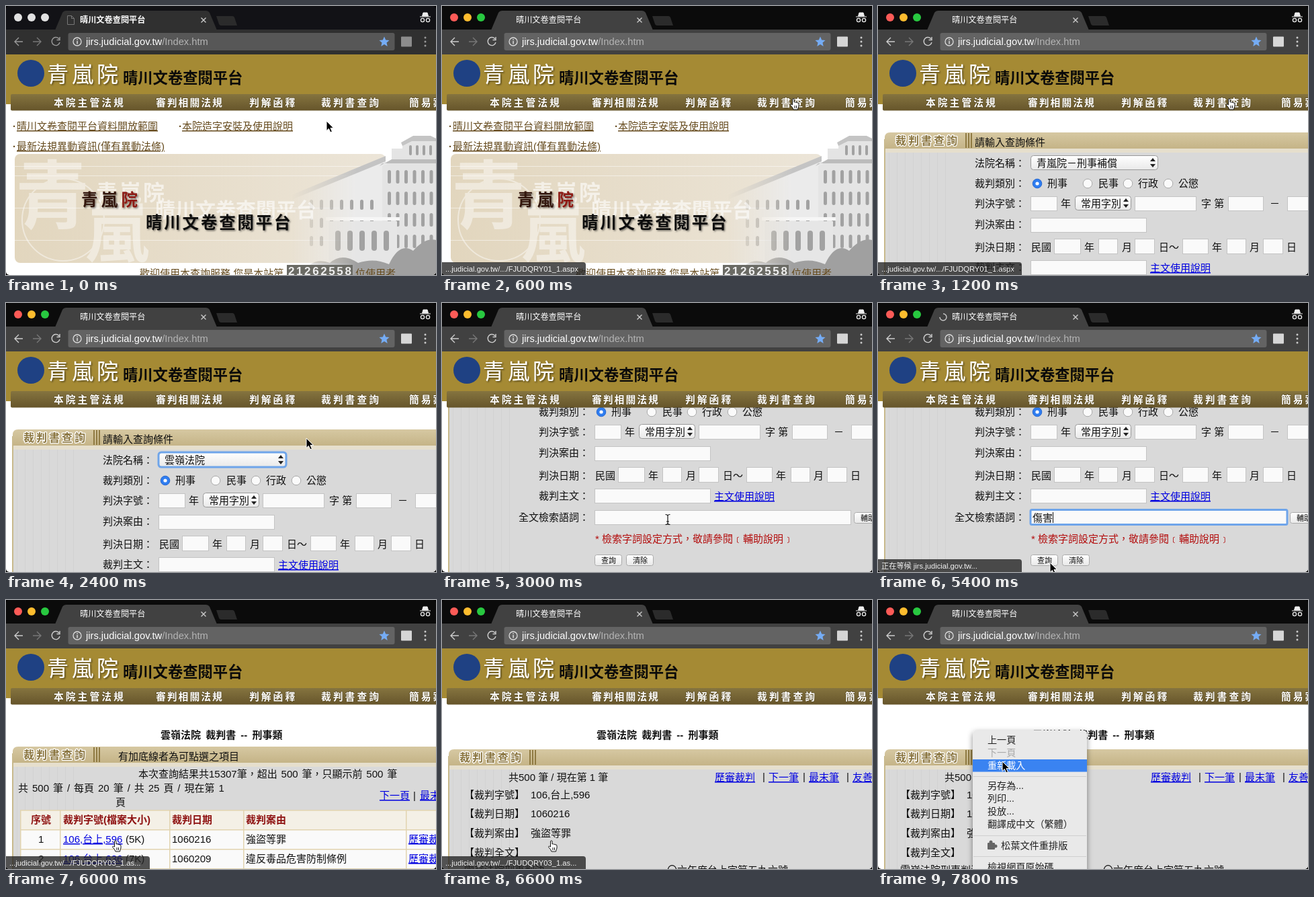
An HTML page for the animation above (8000 ms loop, 640 px wide and 400 px high).

```html
<!DOCTYPE html>
<html lang="zh-Hant">
<head>
<meta charset="utf-8">
<style>
  html, body { margin: 0; width: 100%; height: 100%; overflow: hidden; background: #000; }
  svg { display: block; width: 640px; height: 400px; clip-path: inset(0 round 5px); }
  text { font-family: "Liberation Sans", "Noto Sans CJK TC", "Noto Sans CJK", sans-serif; white-space: pre; }
  .link { text-decoration: underline; }
  .bold { font-weight: 700; }
  .cut { paint-order: stroke; stroke-linejoin: round; }
</style>
</head>
<body>
<svg id="stage" viewBox="0 0 640 400"></svg>
<script>
const COURT = '青嵐院', SITE = '晴川文卷查閱平台', BENCH = '雲嶺法院';
const STEP = 600, LOOP = 8000, SCROLL = 102;

const text = (s, x, y, size = 15, fill = '#111', more = '') =>
  `<text x="${x}" y="${y}" font-size="${size}" fill="${fill}" ${more}>${s}</text>`;
const bold = (s, x, y, size, fill, more = '') => text(s, x, y, size, fill, `class="bold" ${more}`);
const link = (s, x, y, fill = '#0000e0') => text(s, x, y, 15, fill, 'class="link"');
const rect = (x, y, w, h, fill, more = '') =>
  `<rect x="${x}" y="${y}" width="${w}" height="${h}" fill="${fill}" ${more}/>`;
const circle = (x, y, r, fill, more = '') => `<circle cx="${x}" cy="${y}" r="${r}" fill="${fill}" ${more}/>`;
const path = (d, fill = 'none', more = '') => `<path d="${d}" fill="${fill}" ${more}/>`;
const group = (s, x, y, more = '') => `<g transform="translate(${x} ${y})" ${more}>${s}</g>`;
const each = (list, draw) => list.map(draw).join('');
const range = n => [...Array(n).keys()];
const gradient = (id, a, b, dir = 'x2="0" y2="1"') =>
  `<linearGradient id="${id}" ${dir}><stop stop-color="${a}"/><stop offset="1" stop-color="${b}"/></linearGradient>`;

const defs = `<defs>
  ${gradient('nav', '#85743f', '#66552b')}
  ${gradient('tan', '#d6c8a2', '#c4b386')}
  ${gradient('button', '#ffffff', '#e9e9e9')}
  ${gradient('banner', '#e2d6be', '#ece5d8', 'x2="1" y2="0"')}
  ${gradient('fade', '#000', '#fff', 'x2=".45" y2="0"')}
  <mask id="haze">${rect(425, 185, 215, 215, 'url(#fade)')}</mask>
  <filter id="shadow"><feDropShadow dx="0" dy="3" stdDeviation="4" flood-opacity=".45"/></filter>
  <filter id="drop"><feDropShadow dx="1.5" dy="1.5" stdDeviation="1" flood-opacity=".5"/></filter>
</defs>`;

function browser(active, loading) {
  const lights = active ? ['#fc5b57', '#fdbc2e', '#28c840'] : ['#e2e2e2', '#e2e2e2', '#e2e2e2'];
  const bar = active ? '#414141' : '#303030';
  const ink = active ? '#ccc' : '#999';
  const line = 'stroke-width="1.4"';
  return rect(0, 0, 640, 36, active ? '#0b0b0b' : '#121216')
    + each(lights, (c, i) => circle(18 + 20 * i, 17, 6, c))
    + path('M73 36L84 10Q86 7 90 7H297Q301 7 303 10L314 36Z', bar)
    + path('M313 15H337Q339 15 340 17L344 29H320Q318 29 317 27Z', '#2b2b2b')
    + (active ? '' : path('M91.5 14.5h6l4 4v9h-10zM97.5 14.5v4h4', 'none', 'stroke="#777"'))
    + (loading ? path('M97 16a5 5 0 1 1-5 5', 'none', `stroke="#c8c8c8" ${line}`) : '')
    + text(SITE, 110, 25, 12.2, '#fff', active ? '' : 'font-weight="600"')
    + path('M290.5 17.5l7 7m0-7l-7 7', 'none', 'stroke="#ccc" stroke-width="1.4"')
    + path('M616 16h16M619.5 15l1.5-5h6l1.5 5z', '#eee', 'stroke="#eee"')
    + each([620, 628], x => circle(x, 21, 2.6, 'none', 'stroke="#eee" stroke-width="1.3"'))
    + rect(0, 35, 640, 37, bar)
    + path('M25 53H13m6-6l-6 6 6 6', 'none', `stroke="${ink}" ${line}`)
    + path('M40 53H52m-6-6l6 6-6 6', 'none', `stroke="#777" ${line}`)
    + path('M79 49a6 6 0 1 0 1 5M80 46v4.5h-4.5', 'none', `stroke="${ink}" ${line}`)
    + rect(92.5, 40, 486, 26, active ? '#636363' : '#575757', 'rx="3"')
    + circle(106, 53, 6, 'none', 'stroke="#ddd" stroke-width="1.3"')
    + rect(105.3, 52, 1.5, 4.5, '#ddd') + rect(105.3, 49.2, 1.5, 1.6, '#ddd')
    + text('jirs.judicial.gov.tw<tspan fill="#b4b4b4">/Index.htm</tspan>', 119, 58, 14.7, '#fff')
    + path('M563 45.5l2.2 5 5.3.5-4 3.6 1.2 5.3-4.7-2.8-4.7 2.8 1.2-5.3-4-3.6 5.3-.5z', '#75acf5')
    + rect(588, 45.5, 16, 15, active ? '#d6d6d6' : '#8c8c8c', 'rx="1"')
    + each([47, 53, 59], y => circle(624, y, 1.5, ink));
}

function siteHeader() {
  const spaced = s => `letter-spacing="${s}"`;
  const items = [['本院主管法規', 71], ['審判相關法規', 223, 2], ['判解函釋', 362], ['裁判書查詢', 469], ['簡易案件', 600]];
  return rect(0, 72, 640, 71, '#a58a34') + rect(0, 143, 9, 3, '#a58a34')
    + rect(7, 131, 640, 24.5, 'url(#nav)', 'rx="2"')
    + circle(37, 100, 20, '#1f4183')
    + text(COURT, 61, 113, 32, '#fff', `${spaced(5)} filter="url(#drop)"`)
    + bold(SITE, 174, 115, 22.3, '#0a0a0a')
    + each(items, ([s, x, gap = 3]) => text(s, x, 148.5, 14.8, '#fff',
      `class="bold cut" stroke="#5e4f26" stroke-width="1.5" ${spaced(gap)}`));
}

function building() {
  const windows = (x, y, cols, rows, dx, dy, w, h) => each(range(cols * rows), i =>
    rect(x + i % cols * dx, y + Math.floor(i / cols) * dy, w, h, '#a2a2a2', `rx="${w / 2}"`));
  return `<g mask="url(#haze)">`
    + path('M425 284L565 226V400H425Z', '#ebebeb')
    + path('M425 281L565 223V231L425 288Z', '#c4c4c4')
    + path('M560 400V238L574 230V212H590V203L606 194H632L640 198V400Z', '#e4e4e4')
    + path('M556 238L574 228H640V234H560Z', '#bcbcbc')
    + path('M588 203L606 193H632L640 197V201H604L590 208Z', '#c4c4c4')
    + windows(452, 288, 7, 3, 15, 27, 5, 15)
    + windows(568, 244, 6, 4, 12.5, 32, 5, 20)
    + windows(600, 207, 4, 1, 10, 1, 4, 15)
    + path('M480 320H582V400H480Z', '#e6e6e6')
    + rect(476, 314, 110, 5, '#f6f6f6')
    + windows(490, 334, 5, 1, 18, 1, 8, 30)
    + path('M440 400Q455 372 482 382Q500 366 524 382Q548 374 570 384Q586 350 606 364Q624 344 640 348V400Z', '#a0a0a0')
    + '</g>';
}

function home() {
  const brown = '#664b1e', spaced = s => `letter-spacing="${s}"`;
  return bold('·', 10, 184, 15, brown) + link(SITE + '資料開放範圍', 16, 184, brown)
    + bold('·', 257, 184, 15, brown) + link('本院造字安裝及使用說明', 262, 184, brown)
    + bold('·', 10, 214, 15, brown) + link('最新法規異動資訊(僅有異動法條)', 16, 214, brown)
    + rect(13, 220, 552, 162, 'url(#banner)', 'rx="8"')
    + each([238, 252, 300, 348], y => rect(13, y, 552, 1, '#fff', 'opacity=".5"'))
    + '<g opacity=".45">' + bold(COURT[0], 14, 322, 110, '#fff') + bold(COURT[1], 118, 373, 95, '#fff')
    + circle(85, 318, 61, 'none', 'stroke="#fff" stroke-width="2"') + '</g>'
    + building()
    + bold(COURT, 134, 289, 32, '#fff', 'opacity=".6" letter-spacing="3"')
    + bold(SITE, 222, 314, 30, '#fff', 'opacity=".6"')
    + bold(`${COURT.slice(0, 2)}<tspan fill="#8c1a12">${COURT[2]}</tspan>`, 112, 297, 24.5, '#33170c', `${spaced(5.3)} filter="url(#drop)"`)
    + bold(SITE, 208, 331, 24.5, '#0c0c0c', `${spaced(2.8)} filter="url(#drop)"`)
    + text('歡迎使用本查詢服務,您是本站第', 199, 403, 15, brown)
    + rect(418, 385, 98, 15, '#6a6a64')
    + bold('21262558', 420, 400, 17, '#eee', 'letter-spacing="2.6"')
    + text('位使用者', 520, 403, 15, brown);
}

// Grey panel with its tan tab; y is the top of the tab.
function panel(y, caption, x) {
  return rect(9, y + 10, 2, 400, '#c8b98c') + rect(11, y + 29, 629, 500, '#d9d9d9')
    + each(range(8), i => rect(16 + i * 12, y + 29, 1, 500, '#d2d2d2'))
    + path(`M10 ${y + 25}V${y + 8}Q10 ${y} 18 ${y}H640V${y + 25}Z`, 'url(#tan)')
    + rect(11, y + 24, 629, 6, '#e6dfcd')
    + each([130, 134, 138], x => rect(x, y + 1, 2, 22, '#8f7a42'))
    + text('裁判書查詢', 26, y + 18, 16, '#8a753f', 'class="bold cut" stroke="#fff" stroke-width="2.5" letter-spacing="3"')
    + text(caption, x, y + 19.5);
}

const field = (x, y, w, h = 22) => rect(x + .5, y + .5, w - 1, h - 1, '#fafafa', 'stroke="#c4c4c4"');
const ring = (x, y, w, h, r) => rect(x, y, w, h, 'none', `rx="${r}" stroke="#6fa5ea" stroke-width="3"`);
const select = (s, x, y, w) => rect(x + .5, y + .5, w - 1, 21, 'url(#button)', 'rx="4" stroke="#999"')
  + text(s, x + 9, y + 17)
  + path(`M${x + w - 12} ${y + 9}l4-5 4 5zm0 4l4 5 4-5z`, '#222');
const button = (s, x, y, w = 41) => rect(x + .5, y + .5, w - 1, 16, 'url(#button)', 'rx="3" stroke="#aaa"')
  + text(s, x + 10, y + 13, 11);
const radio = (s, x, tx, on) => circle(x, 264, 6.8, on ? '#2f7df0' : '#fafafa', `stroke="${on ? '#2566cf' : '#aaa'}"`)
  + (on ? circle(x, 264, 2.6, '#fff') : '') + text(s, tx, 269);

function form({ court = COURT + '－刑事補償', courtFocus, scrolled, queryFocus, query = '' }) {
  const labels = [['法院名稱：', 239], ['裁判類別：', 269], ['判決字號：', 299], ['判決案由：', 330], ['判決日期：', 364], ['裁判主文：', 394]];
  const dates = [['民國', 228], ['年', 307], ['月', 363], ['日～', 418], ['年', 497], ['月', 553], ['日', 608]];
  const dateFields = [[262, 40], [328, 29], [382, 30], [453, 39], [519, 29], [573, 30]];
  return group(panel(188, '請輸入查詢條件', 144)
    + each(labels, ([s, y]) => text(s, 144, y))
    + select(court, 227, 222, 190) + (courtFocus ? ring(227, 222, 190, 22, 4) : '')
    + radio('刑事', 237, 252, true) + radio('民事', 312, 328) + radio('行政', 372, 387) + radio('公懲', 432, 447)
    + field(227, 283, 40) + text('年', 272, 299) + select('常用字別', 293, 282, 84) + field(382, 283, 92)
    + text('字 第', 481, 299) + field(521, 283, 53) + text('－', 583, 299) + field(609, 283, 53)
    + field(227, 315, 173)
    + each(dates, ([s, x]) => text(s, x, 364)) + each(dateFields, ([x, w]) => field(x, 346, w, 23))
    + field(227, 378, 173) + link('主文使用說明', 405, 395)
    + text('全文檢索語詞：', 114, 426) + field(227, 410, 382) + button('輔助說明', 613, 413, 70)
    + (queryFocus ? ring(227, 409.5, 382, 22, 2) : '')
    + text(query, 230, 427) + (queryFocus ? rect(230 + 15 * query.length, 413, 1, 16, '#111') : '')
    + text('* 檢索字詞設定方式，敬請參閱﹝輔助說明﹞', 228, 458, 15, '#b30d0d')
    + button('查詢', 227, 476) + button('清除', 274, 476), 0, scrolled ? -SCROLL : 0);
}

const pageTitle = bold(BENCH + ' 裁判書 -- 刑事類', 230, 206, 15, '#111', 'word-spacing="3"');

function results() {
  const edges = [22, 81, 244, 354, 596, 660];
  const heads = [['序號', 37], ['裁判字號(檔案大小)', 85], ['裁判日期', 247], ['裁判案由', 357]];
  const rows = [[1, 596, '5K', '1060216', '強盜等罪'], [2, 636, '7K', '1060209', '違反毒品危害防制條例']];
  return pageTitle + panel(218, '有加底線者為可點選之項目', 167)
    + text('本次查詢結果共15307筆，超出 500 筆，只顯示前 500 筆', 197, 264, 15, '#111', 'word-spacing="1.7"')
    + text('共 500 筆 / 每頁 20 筆 / 共 25 頁 / 現在第 1', 18, 285, 15, '#111', 'word-spacing="1.8"')
    + text('頁', 163, 306)
    + link('下一頁', 556, 296) + text('|', 606, 296) + link('最末頁', 616, 296)
    + rect(21, 312, 619, 88, '#e2d4b0')
    + each(range(15), i => rect(edges[i % 5] + .5, 313.5 + 29 * Math.floor(i / 5),
      edges[i % 5 + 1] - edges[i % 5] - 1.5, 27.5, i < 5 ? '#f4f0e6' : '#fafafa'))
    + each(heads, ([s, x]) => bold(s, x, 332, 15, '#8e1212'))
    + each(rows, ([n, id, size, date, cause], i) => {
      const y = 361 + 29 * i;
      return text(n, 48, y) + link('106,台上,' + id, 85, y) + text(`(${size})`, 178, y)
        + text(date, 247, y) + text(cause, 357, y) + link('歷審裁判', 599, y);
    });
}

function verdict() {
  const facts = [['字號', '106,台上,596', 295], ['日期', '1060216', 323], ['案由', '強盜等罪', 352], ['全文', '', 381]];
  const links = [['歷審裁判', 406], ['下一筆', 486], ['最末筆', 546], ['友善列印', 611]];
  return pageTitle + panel(222, '', 167)
    + text('共500 筆 / 現在第 1 筆', 99, 269)
    + each(links, ([s, x]) => link(s, x, 269)) + each([477, 537, 602], x => text('|', x, 268))
    + each(facts, ([k, v, y]) => text(`【裁判${k}】`, 33, y) + text(v, 132, y))
    + text(BENCH + '刑事判決', 33, 407) + text('一〇六年度台上字第五九六號', 320, 407);
}

function menu() {
  const items = [['上一頁', 213], ['下一頁', 232, '#aaa'], ['重新載入', 251, '#fff'], ['另存為...', 281], ['列印...', 300],
    ['投放...', 319], ['翻譯成中文（繁體）', 338], ['檢視網頁原始碼', 402]];
  return rect(141, 194, 170, 220, '#e9e9e9', 'rx="5" filter="url(#shadow)"') + rect(141, 237, 170, 18.5, '#3a83f1')
    + each([262, 350, 381], y => rect(142, y, 168, 1, '#cfcfcf'))
    + each(items, ([s, y, c = '#222']) => text(s, 163, y, 14.1, c))
    + rect(163, 361, 11, 10, '#666', 'rx="1"') + circle(168, 360, 2.5, '#666') + circle(175, 366, 2.5, '#666')
    + text('松葉文件重排版', 183, 370, 14.2, '#222');
}

function status(s) {
  return path('M0 381H210Q214 381 214 385V400H0Z', '#222', 'opacity=".78"') + text(s, 5, 394.5, 11.2, '#f2f2f2');
}

const arrow = (x, y) => group(path('M0 0V14.5L3.4 11.4 5.8 16.8 8.4 15.7 6 10.4H10.5Z', '#000', 'stroke="#fff"'), x, y);
const hand = (x, y) => group(path('M3.5 9V1.5Q5 0 6 1.5V6Q8 5 8.5 6.5Q10 5.5 11 7Q13 6.5 13 8.5V12Q12 14 11.5 17H5Q4 13.5.5 10.5Q.5 8 3.5 10Z',
  '#fff', 'stroke="#111"') + path('M7 11v4M9.5 11v4', 'none', 'stroke="#111"'), x, y);
const beam = (x, y) => group(path('M-3.5-7.5Q0-7.5 0-5.5Q0-7.5 3.5-7.5M0-6V6M-3.5 7.5Q0 7.5 0 5.5Q0 7.5 3.5 7.5M-2 3H2',
  'none', 'stroke="#111" stroke-width="1.2"'), x, y);

const scene = (page, overlay, { active = true, loading = false } = {}) =>
  defs + rect(0, 72, 640, 328, '#fff') + page + siteHeader() + browser(active, loading) + overlay;

const queryUrl = status('...judicial.gov.tw/.../FJUDQRY01_1.aspx');
const resultUrl = status('...judicial.gov.tw/.../FJUDQRY03_1.as...');
const picked = { court: BENCH };
const lower = { ...picked, scrolled: true };
const focused = { ...lower, queryFocus: true };
const typed = { ...focused, query: '傷害' };

const scenes = [
  scene(home(), arrow(477, 171), { active: false }),
  scene(home(), queryUrl + hand(518, 137)),
  scene(form({}), queryUrl + hand(518, 137)),
  scene(form({}), arrow(405, 236)),
  scene(form({ ...picked, courtFocus: true }), arrow(447, 201)),
  scene(form(lower), beam(336, 322)),
  scene(form(focused), beam(336, 322)),
  scene(form(typed), ''),
  scene(form(typed), arrow(256, 386)),
  scene(form(typed), status('正在等候 jirs.judicial.gov.tw...') + arrow(256, 386), { loading: true }),
  scene(results(), resultUrl + hand(158, 357)),
  scene(verdict(), resultUrl + hand(158, 357)),
  scene(verdict(), arrow(142, 194)),
  scene(verdict(), menu() + arrow(185, 240)),
];

const stage = document.getElementById('stage');
let shown = -1;
function tick() {
  const index = Math.floor(performance.now() % LOOP / STEP);
  if (index !== shown) stage.innerHTML = scenes[shown = index];
  requestAnimationFrame(tick);
}
tick();
</script>
</body>
</html>
```
